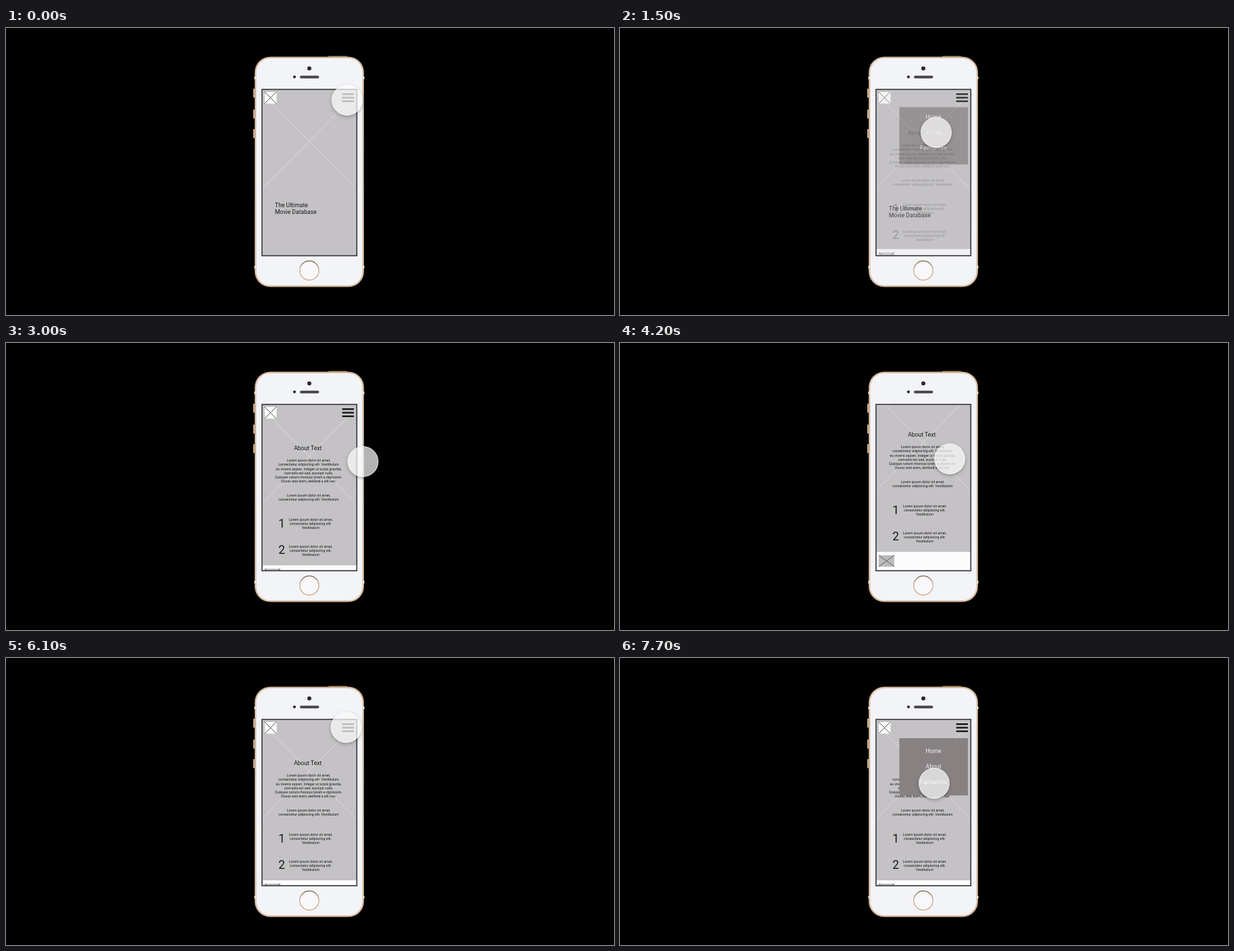
Write an HTML page with a canvas that moves like this. It is 900 px wide and 426 px high and loops after 8000 ms.

```html
<!DOCTYPE html>
<html lang="en">
<head>
<meta charset="utf-8">
<title>Phone wireframe</title>
<style>
html, body { margin: 0; width: 100%; height: 100%; overflow: hidden; background: #000; }
canvas { display: block; width: 900px; height: 426px; filter: blur(.35px); }
</style>
</head>
<body>
<canvas id="stage" width="900" height="426"></canvas>
<script>
const ctx = document.getElementById('stage').getContext('2d');
const LOOP = 8000, STEP = 100;
const GREY = '#c4c2c4', INK = '#19181a', EDGE = '#3e3d41', GOLD = '#d3b394';
const FONT = 'Roboto, Arial, sans-serif';

const HOME = { x: 505, y: 107 };
const MOVES = [
  { at: 300, span: 500, x: 495, y: 121 },
  { at: 900, span: 400, x: 468, y: 155 },
  { at: 2200, span: 400, x: 528.5, y: 176 },
  { at: 3000, span: 400, x: 516, y: 155 },
  { at: 3700, span: 200, x: 488, y: 172 },
  { at: 5600, span: 300, x: 503.5, y: 103 },
  { at: 6600, span: 700, x: 471, y: 168 },
  { at: 7400, span: 300, x: 465, y: 186 }
];

const LOREM = 'Lorem ipsum dolor sit amet,';
const INTRO = [
  LOREM,
  'consectetur adipiscing elit. Vestibulum',
  'eu viverra sapien. Integer ut turpis gravida,',
  'convallis est sed, suscipit nulla.',
  'Quisque rutrum rhoncus lorem a dignissim.',
  'Donec erat enim, eleifend a elit nec.'
];
const ITEM = [LOREM, 'consectetur adipiscing elit.', 'Vestibulum'];

// Smooth rise from 0 to 1.
function ramp(t, at, span) {
  const p = Math.min(1, Math.max(0, (t - at) / span));
  return p * p * (3 - 2 * p);
}

function rect(x, y, w, h, color) {
  ctx.fillStyle = color;
  ctx.fillRect(x, y, w, h);
}

function round(x, y, w, h, r, color) {
  ctx.beginPath();
  ctx.roundRect(x, y, w, h, r);
  ctx.fillStyle = color;
  ctx.fill();
}

function disc(x, y, r, color) {
  ctx.beginPath();
  ctx.arc(x, y, r, 0, Math.PI * 2);
  ctx.fillStyle = color;
  ctx.fill();
}

function ring(x, y, r, color, width) {
  ctx.beginPath();
  ctx.arc(x, y, r, 0, Math.PI * 2);
  ctx.strokeStyle = color;
  ctx.lineWidth = width;
  ctx.stroke();
}

function cross(x, y, w, h, color, width) {
  ctx.beginPath();
  ctx.moveTo(x, y);
  ctx.lineTo(x + w, y + h);
  ctx.moveTo(x + w, y);
  ctx.lineTo(x, y + h);
  ctx.strokeStyle = color;
  ctx.lineWidth = width;
  ctx.stroke();
}

function shade(y1, y2, ...colors) {
  const g = ctx.createLinearGradient(0, y1, 0, y2);
  colors.forEach((c, i) => g.addColorStop(i / (colors.length - 1), c));
  return g;
}

function text(str, x, y, size, color = INK, align = 'center') {
  ctx.font = size + 'px ' + FONT;
  ctx.textAlign = align;
  ctx.fillStyle = color;
  ctx.fillText(str, x, y);
}

function lines(list, x, y) {
  list.forEach((s, i) => text(s, x, y + i * 6.08, 5.2));
}

function faded(alpha, draw) {
  if (alpha <= 0) return;
  ctx.save();
  ctx.globalAlpha = alpha;
  draw();
  ctx.restore();
}

function phone() {
  for (const y of [90, 121, 150]) round(366, y, 4, 13.5, 1, GOLD);
  round(477, 41.5, 28, 3, 1, '#a98a68');
  round(368, 42.5, 162, 342, 23, shade(42, 385, '#a98b6c', '#8f7c69', '#b59a7c'));
  round(368.8, 43.3, 160.4, 340.4, 22.2, shade(42, 385, '#dcc5ac', '#d9c9b8', '#dcc3a7'));
  for (const y of [72, 353]) {
    rect(367.5, y, 2, 4, '#f0ece8');
    rect(528.5, y, 2, 4, '#f0ece8');
  }
  round(370.6, 45, 156.8, 337, 20.5, '#f3f4f8');
  disc(449, 60, 3, '#29292d');
  disc(427, 72.6, 2.1, '#29292d');
  round(435, 70.7, 28.5, 4, 2, '#48474b');
  disc(449, 360, 14, '#f8f8fb');
  ring(449, 360, 14.2, shade(346, 374, '#8d765f', '#d3bda5', '#cfae8a'), 1.6);
}

function backdrop(footer) {
  rect(380, 70, 139, 290, GREY);
  cross(380, 98, 137.5, 140, '#dfdddf', .9);
  rect(380, footer, 139, 40, '#fcfcfd');
  rect(383, footer + 5, 23, 17, '#bdbbbd');
  cross(383, footer + 5, 23, 17, '#555457', .9);
}

function header() {
  rect(383, 95, 17.5, 17.2, '#fdfdfd');
  cross(383, 95, 17, 17, '#59575a', 1);
  for (let i = 0; i < 3; i++) rect(497.7, 97 + i * 5.3, 17.3, 2.3, '#111');
}

function homePage(open) {
  const y = 266.2 + 4.7 * open;
  backdrop(340 - 12 * open);
  header();
  text('The Ultimate', 398, y, 8.65, INK, 'left');
  text('Movie Database', 398, y + 9.8, 8.65, INK, 'left');
}

function aboutPage() {
  backdrop(330);
  header();
  text('About Text', 446.8, 159, 8.55);
  lines(INTRO, 448, 176.4);
  lines(INTRO.slice(0, 2), 448, 227.6);
  for (let i = 0; i < 2; i++) {
    text(i + 1, 408.2, 274.2 + i * 39, 17.5);
    lines(ITEM, 451, 263.7 + i * 40.5);
  }
}

function menu(top, firstLine) {
  rect(413.5, top, 101.5, 85, '#878182');
  ['Home', 'About', 'Favourites'].forEach((s, i) =>
    text(s, 464, firstLine + i * 23.2, 8.6, '#f4f3f4'));
}

function screen(t) {
  const open = ramp(t, 200, 300);
  const about = ramp(t, 1400, 300);
  const scroll = 20 * (ramp(t, 4100, 100) - ramp(t, 4800, 300));
  ctx.save();
  ctx.beginPath();
  ctx.rect(380, 92, 139, 245);
  ctx.clip();
  homePage(open);
  faded(open, () => menu(117.5, 134.5));
  faded(about, () => {
    ctx.translate(0, -scroll);
    aboutPage();
  });
  faded(ramp(t, 6600, 300), () => menu(119, 141));
  ctx.restore();
  ctx.strokeStyle = EDGE;
  ctx.lineWidth = 1.7;
  ctx.strokeRect(379, 91.2, 140.3, 246.8);
}

function pointerAt(t) {
  let from = HOME, x = from.x, y = from.y;
  for (const move of MOVES) {
    const p = ramp(t, move.at, move.span);
    x += (move.x - from.x) * p;
    y += (move.y - from.y) * p;
    from = move;
  }
  return [x, y];
}

function pointer(t) {
  const [x, y] = pointerAt(t);
  const r = 22.8;
  // The disc thins out after the tap and recovers as it leaves.
  const thin = ramp(t, 1500, 300) - ramp(t, 2200, 400);
  ctx.save();
  ctx.beginPath();
  ctx.rect(0, 0, 900, 426);
  ctx.arc(x, y, r, 0, Math.PI * 2);
  ctx.clip('evenodd');
  ctx.shadowColor = `rgba(0,0,0,${.28 - .2 * thin})`;
  ctx.shadowBlur = 5;
  ctx.shadowOffsetY = 2;
  disc(x, y, r, '#fff');
  ctx.restore();
  disc(x, y, r, `rgba(250,250,250,${.72 - .22 * thin})`);
  ring(x, y, r - .7, 'rgba(255,255,255,.3)', 1.4);
}

function frame(now) {
  const t = Math.floor((now % LOOP) / STEP) * STEP;
  rect(0, 0, 900, 426, '#000');
  phone();
  screen(t);
  pointer(t);
}

const start = performance.now();
function loop() {
  frame(performance.now() - start);
  requestAnimationFrame(loop);
}
loop();
</script>
</body>
</html>
```
